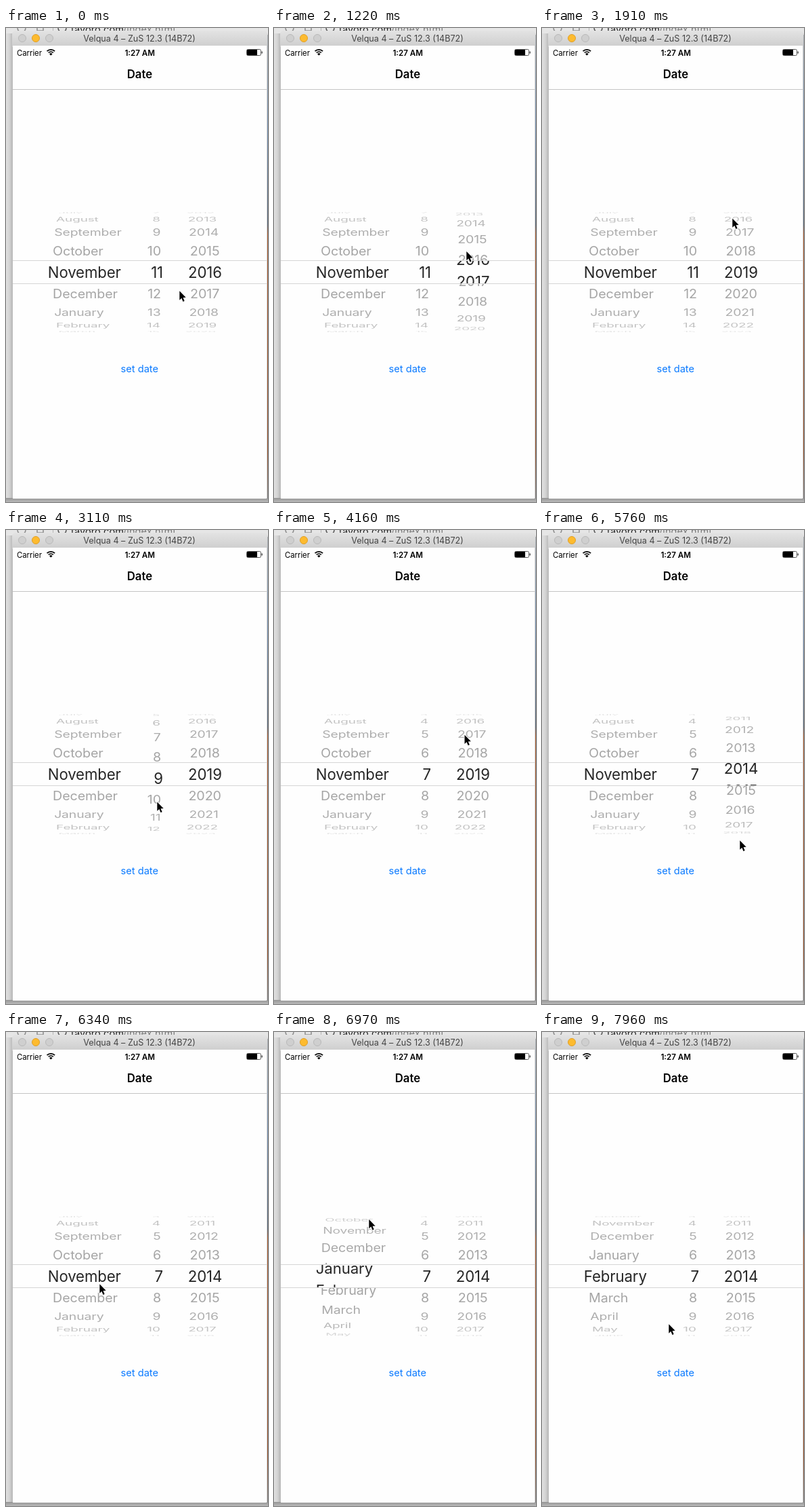
An HTML page with a canvas that plays this animation: 387 px wide and 698 px high, repeating every 8000 ms.

```html
<!DOCTYPE html>
<html lang="en">
<head>
<meta charset="utf-8">
<title>Date picker</title>
<style>
html, body { margin: 0; width: 100%; height: 100%; overflow: hidden; background: #fff; }
canvas { display: block; width: 387px; height: 698px; }
</style>
</head>
<body>
<canvas id="stage"></canvas>
<script>
const W = 387, H = 698, LOOP = 8000;
const canvas = document.getElementById('stage');
const ctx = canvas.getContext('2d');
const dpr = window.devicePixelRatio || 1;
canvas.width = W * dpr;
canvas.height = H * dpr;

const FONT = 'Inter, Roboto, "Liberation Sans", sans-serif';
const MONTHS = ['January', 'February', 'March', 'April', 'May', 'June', 'July',
  'August', 'September', 'October', 'November', 'December'];

// Pointer stops: time, x, y
const PATH = [
  [50, 256, 387], [280, 284, 366], [930, 284, 366], [1680, 284, 254.5],
  [1740, 284, 254.5], [1910, 281, 280], [2420, 220, 312], [2650, 220, 312],
  [3110, 223, 400], [3400, 222, 447], [3640, 222, 447], [4220, 283, 297],
  [4460, 283, 297], [4980, 292, 425], [5220, 292, 457], [5760, 292, 457],
  [6340, 138, 371], [6520, 138, 371], [6970, 140, 276], [7020, 140, 266.5],
  [7320, 141, 274], [7380, 141, 274], [7960, 187, 430]
];

const mod = (a, n) => ((a % n) + n) % n;

function slope(i, k) {
  return (PATH[i + 1][k] - PATH[i][k]) / (PATH[i + 1][0] - PATH[i][0]);
}

function tangent(i, k) {
  if (i === 0 || i === PATH.length - 1) return 0;
  const a = slope(i - 1, k), b = slope(i, k);
  return a * b <= 0 ? 0 : 2 * a * b / (a + b);
}

// Monotone cubic through the stops; k is 1 for x, 2 for y
function pointer(t, k) {
  const last = PATH.length - 1;
  if (t <= PATH[0][0]) return PATH[0][k];
  if (t >= PATH[last][0]) return PATH[last][k];
  let i = 0;
  while (t > PATH[i + 1][0]) i++;
  const d = PATH[i + 1][0] - PATH[i][0], u = (t - PATH[i][0]) / d;
  const u2 = u * u, u3 = u2 * u;
  return (2 * u3 - 3 * u2 + 1) * PATH[i][k] + (u3 - 2 * u2 + u) * d * tangent(i, k) +
    (3 * u2 - 2 * u3) * PATH[i + 1][k] + (u3 - u2) * d * tangent(i + 1, k);
}

// Drum geometry
const MID = 359.5, CX = 197, RADIUS = 88, STEP = 21 * Math.PI / 180;
const ROW = RADIUS * STEP, BAND_TOP = 342.5, BAND_BOTTOM = 376.5;
const SLOP = 10, LAG = 40;

const wheels = [
  { start: 10, align: 'left', x: 68.4, bigX: 61.8, label: n => MONTHS[mod(n, 12)],
    drags: [{ from: 6520, to: 7360, end: 13, settle: 260 }] },
  { start: 11, align: 'right', x: 229.2, bigX: 232, label: n => String(mod(n - 1, 31) + 1),
    drags: [{ from: 2650, to: 3620, end: 7, settle: 260 }] },
  { start: 2016, align: 'center', x: 294.2, bigX: 294, label: n => String(n),
    drags: [{ from: 930, to: 1730, end: 2019, settle: 170 },
            { from: 4460, to: 5740, end: 2014, settle: 260 }] }
];

function dragged(base, from, t) {
  const dy = pointer(Math.max(from, t - LAG), 2) - pointer(from, 2);
  return base - Math.sign(dy) * Math.max(0, Math.abs(dy) - SLOP) / ROW;
}

function wheelValue(wheel, t) {
  let v = wheel.start;
  for (const d of wheel.drags) {
    if (t < d.from) break;
    if (t < d.to) return dragged(v, d.from, t);
    const left = 1 - Math.min(1, (t - d.to) / d.settle);
    v = d.end + (dragged(v, d.from, d.to) - d.end) * left ** 3;
  }
  return v;
}

function text(str, x, y, size, color, align = 'left', weight = 400, spacing = 0) {
  ctx.font = `${weight} ${size}px ${FONT}`;
  ctx.letterSpacing = spacing + 'px';
  ctx.textAlign = align;
  ctx.fillStyle = color;
  ctx.fillText(str, x, y);
}

function rect(x, y, w, h, color) {
  ctx.fillStyle = color;
  ctx.fillRect(x, y, w, h);
}

function circle(x, y, r, fill, stroke) {
  ctx.beginPath();
  ctx.arc(x, y, r, 0, 7);
  if (fill) { ctx.fillStyle = fill; ctx.fill(); }
  if (stroke) { ctx.strokeStyle = stroke; ctx.stroke(); }
}

function gradient(x0, y0, x1, y1, ...stops) {
  const g = ctx.createLinearGradient(x0, y0, x1, y1);
  for (const [at, color] of stops) g.addColorStop(at, color);
  return g;
}

function drawRow(wheel, n, offset, big) {
  const angle = offset * STEP;
  if (Math.abs(angle) > 1.53) return;
  const c = Math.cos(angle), y = MID + RADIUS * Math.sin(angle);
  const size = big ? 22.2 : 19.8;
  const s = big ? 1 : 1 / (1 + 0.085 * (1 - c));
  const shade = Math.round(164 + 75 * (1 - c) ** 1.5);
  ctx.save();
  ctx.translate(big ? wheel.bigX : CX + (wheel.x - CX) * s, y + 0.3);
  ctx.scale(s, s * c);
  text(wheel.label(n), 0, size * 0.364, size,
    big ? '#262626' : `rgb(${shade},${shade},${shade})`, wheel.align, 400, -0.1);
  ctx.restore();
}

function drawWheels(t) {
  const zones = [[271, BAND_TOP, false], [BAND_TOP, BAND_BOTTOM, true], [BAND_BOTTOM, 448, false]];
  for (const [top, bottom, big] of zones) {
    ctx.save();
    ctx.beginPath();
    ctx.rect(10, top, 375, bottom - top);
    ctx.clip();
    for (const wheel of wheels) {
      const v = wheelValue(wheel, t), mid = Math.round(v);
      for (let n = mid - 5; n <= mid + 5; n++) drawRow(wheel, n, n - v, big);
    }
    ctx.restore();
  }
  rect(10, 342, 375, 1, '#d6d6d6');
  rect(10, 376, 375, 1, '#d6d6d6');
}

function drawBackdrop() {
  rect(0, 0, W, H, '#d9d9d9');
  rect(0, 0, W, 8, '#e6e6e6');
  ctx.lineWidth = 1.5;
  circle(23, 0, 6, null, '#8b8b8b');
  ctx.strokeStyle = '#8b8b8b';
  ctx.strokeRect(46, -5, 9, 9);
  rect(69, 0, 1, 5, '#b5b5b5');
  circle(83, 0, 6, null, '#555');
  text('tavoro.com', 96, 7, 14.5, '#222', 'left', 400, 0.1);
  text('/index.html', 173, 7, 14.5, '#777', 'left', 400, 0.1);
  rect(0, 8, 10, H, gradient(0, 0, 10, 0, [0, '#e0e0e0'], [0.5, '#d4d4d4'], [1, '#b6b6b6']));
  rect(0, 692, W, 6, gradient(0, 692, 0, 698, [0, '#949494'], [1, '#b9b9b9']));
  rect(385, 10, 1, 682, '#d0d0d0');
  rect(386, 10, 1, 682, gradient(0, 10, 0, 692, [0, '#a5a9ad'], [0.2, '#6f8bad'],
    [0.41, '#4d5b6c'], [0.43, '#a4562a'], [0.9, '#8f4a24'], [1, '#777']));
}

function drawWindow() {
  ctx.fillStyle = gradient(0, 4, 0, 26, [0, '#e3e3e3'], [1, '#cfcfcf']);
  ctx.beginPath();
  ctx.roundRect(9, 4, 377, 24, [5, 5, 0, 0]);
  ctx.fill();
  ctx.lineWidth = 1;
  circle(24, 15, 5.5, '#cfcfcf', '#b9b9b9');
  circle(44, 15, 5.5, '#fdbb2f', '#e0a028');
  circle(64, 15, 5.5, '#cfcfcf', '#b9b9b9');
  text('Velqua 4 – ZuS 12.3 (14B72)', 197, 20, 12.6, '#444', 'center');
  rect(10, 26, 375, 667, '#fefefe');
}

function drawStatusBar() {
  text('Carrier', 16, 41, 11.3, '#000');
  ctx.strokeStyle = '#000';
  ctx.lineWidth = 1.7;
  for (const r of [5, 8.2]) {
    ctx.beginPath();
    ctx.arc(66.3, 40, r, -Math.PI * 0.75, -Math.PI * 0.25);
    ctx.stroke();
  }
  ctx.fillStyle = '#000';
  ctx.beginPath();
  ctx.moveTo(66.3, 40.5);
  ctx.arc(66.3, 40.5, 3.2, -Math.PI * 0.75, -Math.PI * 0.25);
  ctx.fill();
  text('1:27 AM', 197.7, 41, 11.6, '#000', 'center', 600);
  ctx.lineWidth = 1;
  ctx.strokeStyle = '#555';
  ctx.beginPath();
  ctx.roundRect(355.5, 31.5, 21, 9, 2);
  ctx.stroke();
  rect(356, 32, 15, 8, '#000');
  rect(377.5, 34.5, 1.5, 3, '#555');
}

function drawPointer(x, y) {
  ctx.save();
  ctx.translate(x + 0.3, y + 0.3);
  ctx.scale(0.92, 0.92);
  ctx.beginPath();
  const pts = [0, 0, 0, 14.5, 3.3, 11.4, 5.6, 17, 8, 16, 5.7, 10.6, 10.2, 10.4];
  for (let i = 0; i < pts.length; i += 2) ctx.lineTo(pts[i], pts[i + 1]);
  ctx.closePath();
  ctx.lineJoin = 'round';
  ctx.lineWidth = 2;
  ctx.strokeStyle = '#fff';
  ctx.stroke();
  ctx.fillStyle = '#000';
  ctx.fill();
  ctx.restore();
}

function draw(t) {
  ctx.setTransform(dpr, 0, 0, dpr, 0, 0);
  drawBackdrop();
  drawWindow();
  drawStatusBar();
  text('Date', 197.4, 74, 16.7, '#000', 'center', 600);
  rect(10, 90, 375, 1, '#c4c4c4');
  drawWheels(t);
  text('set date', 197.3, 507, 14.6, '#0a7aff', 'center');
  drawPointer(pointer(t, 1), pointer(t, 2));
}

const began = performance.now();
function tick() {
  draw((performance.now() - began) % LOOP);
  requestAnimationFrame(tick);
}
tick();
</script>
</body>
</html>
```
